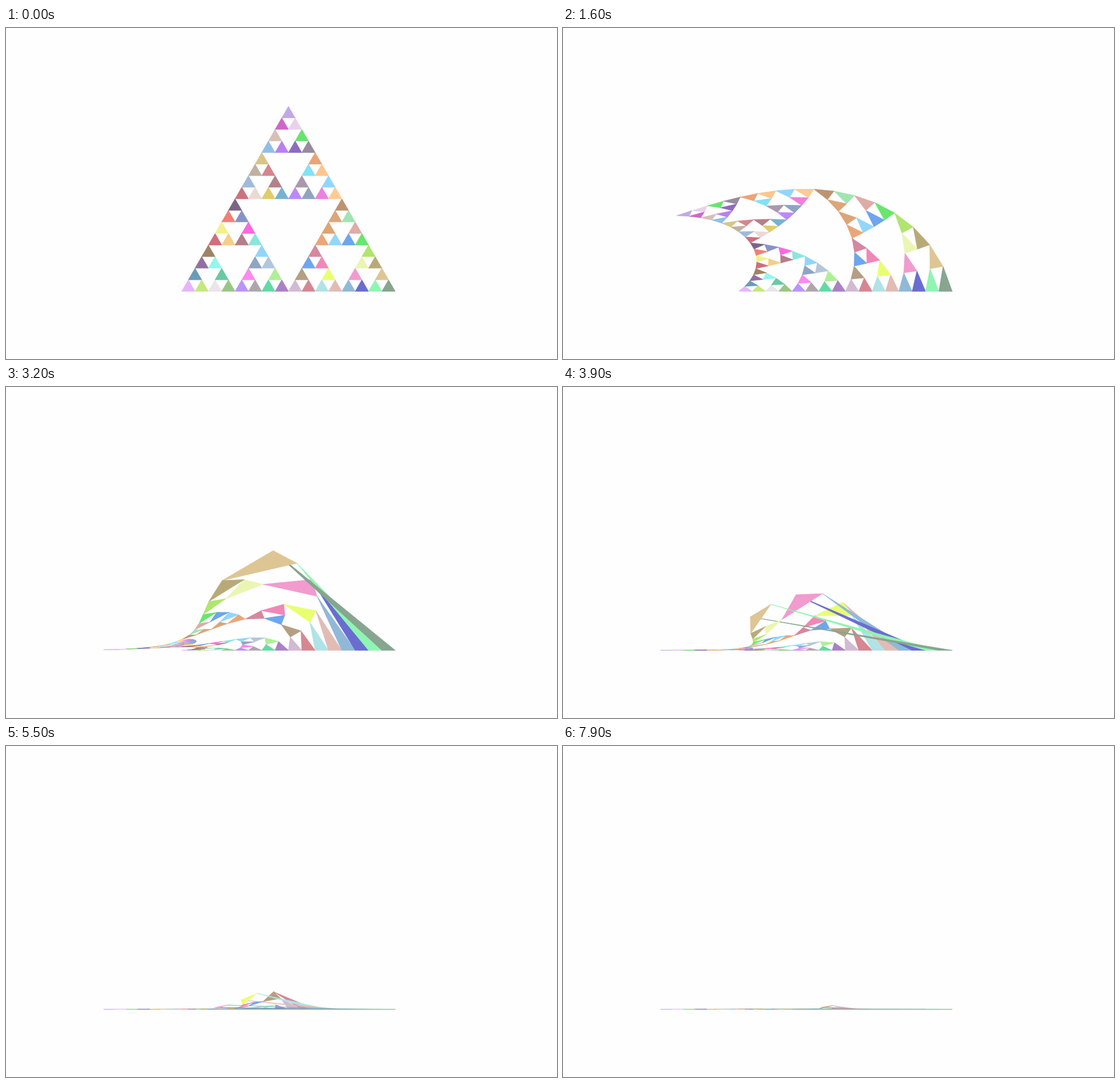
An HTML page with a canvas for the animation above (8000 ms loop, 966 px wide and 580 px high).

```html
<!DOCTYPE html>
<html lang="en">
<head>
<meta charset="utf-8">
<title>Swirling Sierpinski triangle</title>
<style>
html, body { margin: 0; width: 100%; height: 100%; overflow: hidden; background: #fefefe; }
canvas { display: block; }
</style>
</head>
<body>
<canvas id="stage" width="966" height="580"></canvas>
<script>
const ctx = document.getElementById('stage').getContext('2d');
const STEP = 100, STEPS = 80;   // ms per step, steps per loop
const CX = 495.2, BASE = 461.4, SIDE = 374.4, RISE = Math.sqrt(3) / 2;
const TWIST = 3.355e-5;         // radians per pixel of height, per step number

// Colours in recursive order: left, right, top.
const colours = `
e7b4fc c5e87d 6a9bba ebe4ea 98c783 68caa3 9070a0 95f5ed 9d8463
bb93fd afa6ac fc89ef 62daa5 aa80c7 afef96 90a5c3 b3c6dc 92d5fc
d06e7b f4cf87 f1f18d b37f8b 8ae6dd fd68df ef8077 8693c6 7b6586
d2bad2 d68791 b59f82 b0e3e6 e1bcb5 e9ff70 6ea6ee f287b7 d787a0
90b9d8 6a6dd0 f19bcf 8ff5b2 87a58f dec594 ebf5b3 b8aa78 b0e56e
eba678 92d7fa dca576 6da5ee 68e66e deaca7 dba67a a0e4b4 bc9470
cc717d ebdad2 a0bada e0cc68 76b3d0 b4808b c0b1a0 d4868f d8c588
ba8afc 8fa4c1 aa98ac ed81dd fecb94 92d6fc 80e3f3 fdc68f eaa478
92bee6 b980ef d8bfb6 8d6cbf 988b9d 69e36f cf66c8 e8d1ed c0a9e6
`.trim().split(/\s+/);

const triangles = [];

function corners(x, y, side) {
  return [[x, y], [x + side, y], [x + side / 2, y + side * RISE]];
}

function divide(x, y, side, depth) {
  if (!depth) {
    triangles.push(corners(x, y, side));
    return;
  }
  for (const [cx, cy] of corners(x, y, side / 2)) divide(cx, cy, side / 2, depth - 1);
}

// Each step turns a point about the base centre by an angle proportional to its height.
function swirl([x, y], steps) {
  const radius = Math.hypot(x, y);
  let angle = Math.atan2(y, x);
  for (let n = 1; n <= steps; n++) angle += TWIST * n * radius * Math.sin(angle);
  return [CX + radius * Math.cos(angle), BASE - radius * Math.sin(angle)];
}

function draw(steps) {
  ctx.fillStyle = '#fefefe';
  ctx.fillRect(0, 0, 966, 580);
  ctx.lineWidth = 0.8;
  ctx.lineJoin = 'round';
  triangles.forEach((points, i) => {
    ctx.fillStyle = ctx.strokeStyle = '#' + colours[i];
    ctx.beginPath();
    for (const point of points) ctx.lineTo(...swirl(point, steps));
    ctx.closePath();
    ctx.fill();
    ctx.stroke();
  });
}

divide(-SIDE / 2, 0, SIDE, 4);

const start = performance.now();
let shown = -1;
function tick() {
  const step = Math.floor((performance.now() - start) / STEP) % STEPS;
  if (step !== shown) draw(shown = step);
  requestAnimationFrame(tick);
}
tick();
</script>
</body>
</html>
```
